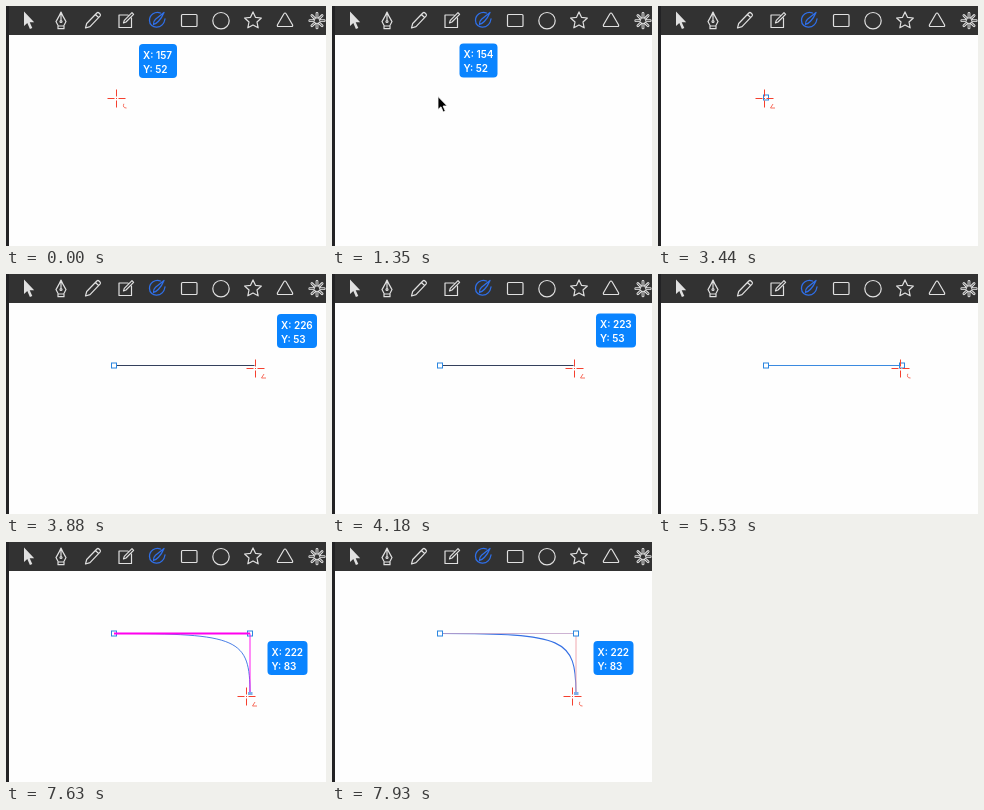
Write an HTML page that moves like this. It is 320x240 px and loops after 8000 ms.

```html
<!DOCTYPE html>
<html lang="en">
<head>
<meta charset="utf-8">
<title>Curve tool</title>
<style>
html, body { margin: 0; width: 100%; height: 100%; overflow: hidden; background: #fefefe; }
svg { display: block; width: 320px; height: 240px; }
text { font: 600 10px Inter, "Open Sans", sans-serif; fill: #fff; }
.tools { fill: none; stroke: #e0e0e0; stroke-width: 1.2; stroke-linejoin: round; stroke-linecap: round; }
</style>
</head>
<body>
<svg viewBox="0 0 320 240">
  <rect width="320" height="240" fill="#fefefe"/>
  <rect width="320" height="29" fill="#323232"/>
  <rect width="3" height="240" fill="#222224"/>
  <g class="tools">
    <path d="M18 5.500V20l3.300-3 2.600 6 2.400-1-2.600-5.800h4.500z" fill="#e0e0e0" stroke="none"/>
    <path d="M55 6c-1.500 4-3.500 7-5 9.500l2.300 4.500h5.400l2.300-4.500C58.500 13 56.500 10 55 6zM55 7v7M52 20v2.700h6V20"/>
    <circle cx="55" cy="15.500" r="1"/>
    <path d="M79.500 22l1.200-4.500L90.800 7q1.200-1 2.200 0l1 1q1 1 0 2.200L84 20.700zM89.500 8.500l3 3"/>
    <path d="M122 9h-9v12.500h12.500V12M117.500 17l.8-2.600 7.700-7.700 1.600 1.600-7.600 7.700z"/>
    <path d="M154.500 7a8 8 0 0 0-11 7.500c0 9 14 9 15.500-1.500M147.500 18.500q-.5-3 2-5.300L158 6.500q-2 5-5.500 8.800-2 2.200-5 3.200z" stroke="#2f6fe8" stroke-width="1.300"/>
    <rect x="175.500" y="8.500" width="15.500" height="12" rx="1"/>
    <circle cx="215" cy="14.700" r="8.200"/>
    <path id="star"/>
    <path d="M279 7q.7 0 1.100.8l6.400 11q.6 1.700-1 1.700h-13q-1.600 0-1-1.700l6.400-11q.4-.8 1.100-.8z"/>
    <g id="burst"></g>
  </g>
  <g id="scene"></g>
</svg>
<script>
const $ = id => document.getElementById(id);
const polar = (x, y, r, a) => `${x + r * Math.sin(a)} ${y - r * Math.cos(a)}`;

$("star").setAttribute("d", "M" + Array.from({ length: 10 }, (_, i) =>
  polar(247, 14.7, i % 2 ? 4.2 : 8.8, i * Math.PI / 5)).join("L") + "z");
// Hollow rays: a wide light stroke with a thin dark one on top.
const rays = Array.from({ length: 8 }, (_, i) => {
  const a = i * Math.PI / 4;
  return `M${polar(311, 14.7, 3.5, a)}L${polar(311, 14.7, 7.2, a)}`;
}).join("");
$("burst").innerHTML = `<path d="${rays}" stroke-width="2.800"/><path d="${rays}" stroke="#323232" stroke-width=".9"/>`;

const LOOP = 8000, START = [108, 91.5], END_X = 244;

// Each step changes some properties of the state before it.
const steps = [
  [0, { x: 110.5, y: 92.5, tip: [133, 38, 157, 52], mark: "c" }],
  [150, { x: 106.5, tip: [127.5, 37.5, 154, 52] }],
  [1350, { arrow: true }],
  [1500, { arrow: false }],
  [1950, { arrow: true }],
  [2100, { arrow: false }],
  [2540, { mark: "L" }],
  [3290, { first: true }],
  [3440, { tip: null }],
  [3730, { x: 170.5, y: 93.5, tip: [194, 38.5, 187, 53], line: "#34405c" }],
  [3880, { x: 249.5, y: 94.5, tip: [271, 40, 226, 53] }],
  [4030, { x: 248.5, tip: [270.5, 40, 226, 53] }],
  [4180, { x: 242.5, tip: [264, 39.5, 223, 53] }],
  [4480, { mark: "c" }],
  [5230, { second: true }],
  [5380, { tip: null, line: "#3c70c0" }],
  [5530, { line: "#3b8ae0" }],
  [5680, { x: 241.5, y: 131.5, tip: [262.5, 61.5, 222, 64], line: "", bend: 129, guide: "#f0e" }],
  [5830, { x: 240.5, y: 154.5, tip: [261.5, 99, 222, 83], bend: 152 }],
  [5980, { dot: true }],
  [6880, { mark: "L" }],
  [7630, { third: true }],
  [7780, { tip: null, guide: "" }],
  [7930, { tip: [261.5, 99, 222, 83], mark: "c" }]
];

const stroke = (d, color, w = 1) => `<path d="${d}" fill="none" stroke="${color}" stroke-width="${w}"/>`;
const anchor = (x, y) =>
  `<rect x="${x - 2.5}" y="${y - 2.5}" width="5" height="5" fill="#fff" stroke="#2b86e0"/>`;

function curve({ bend, guide }) {
  const [x, y] = START, k = 0.92;
  const side = `M${END_X} ${y}V${bend}`, top = `M${x} ${y}H${END_X}`;
  const path = `M${x} ${y}C${x + (END_X - x) * k} ${y} ${END_X} ${bend - (bend - y) * k} ${END_X} ${bend}`;
  return stroke(path, "#3570e4", guide ? 0.9 : 1.1) +
    stroke(top, guide || "#c0a0c8", guide ? 1.8 : 0.8) +
    stroke(side, guide || "#f0a0a8", 0.9);
}

function pointer({ x, y, arrow, mark }) {
  if (arrow) return `<path transform="translate(106 90.500)" fill="#000" stroke="#fff" stroke-width=".8"
    d="M0 0V13l3-2.700 2.200 5.200 2.100-.9L5.100 9.500h4.100z"/>`;
  const tail = mark === "c"
    ? "m7.300 5.300q-1.500 4.200 2.700 4.200"
    : "m8.500 5.500l-2.500 4h4.500";
  return stroke(`M${x - 9} ${y}h7m4 0h7M${x} ${y - 9}v7m0 4v7M${x - .5} ${y}h1`, "#f5402f") +
    stroke(`M${x} ${y}${tail}`, "#f5604f", 0.9);
}

function label([x, y, px, py]) {
  const w = px < 180 ? 38 : 40;
  return `<rect x="${x}" y="${y}" width="${w}" height="34" rx="4" fill="#0a84ff"/>
    <text x="${x + 4}" y="${y + 14.8}">X: ${px}</text>
    <text x="${x + 4}" y="${y + 28.8}">Y: ${py}</text>`;
}

function draw(s) {
  let out = "";
  if (s.line) out += stroke(`M${START[0]} ${START[1]}H${s.second ? END_X : s.x - 1}`, s.line);
  if (s.bend && !s.guide) out += curve(s);
  if (s.first) out += anchor(...START);
  if (s.second) out += anchor(END_X, START[1]);
  if (s.bend && s.guide) out += curve(s);
  if (s.dot) out += `<circle cx="${END_X}" cy="152" r="1" fill="#2b86e0"/>`;
  if (s.third) out += `<rect x="${END_X - 2}" y="150" width="4.500" height="3" fill="#7fb0e8"/>`;
  out += pointer(s);
  if (s.tip) out += label(s.tip);
  $("scene").innerHTML = out;
}

let shown = -1;
function tick(now) {
  const t = now % LOOP;
  const past = steps.filter(([at]) => at <= t);
  if (past.length !== shown) {
    shown = past.length;
    draw(Object.assign({}, ...past.map(p => p[1])));
  }
  requestAnimationFrame(tick);
}
tick(0);
</script>
</body>
</html>
```
